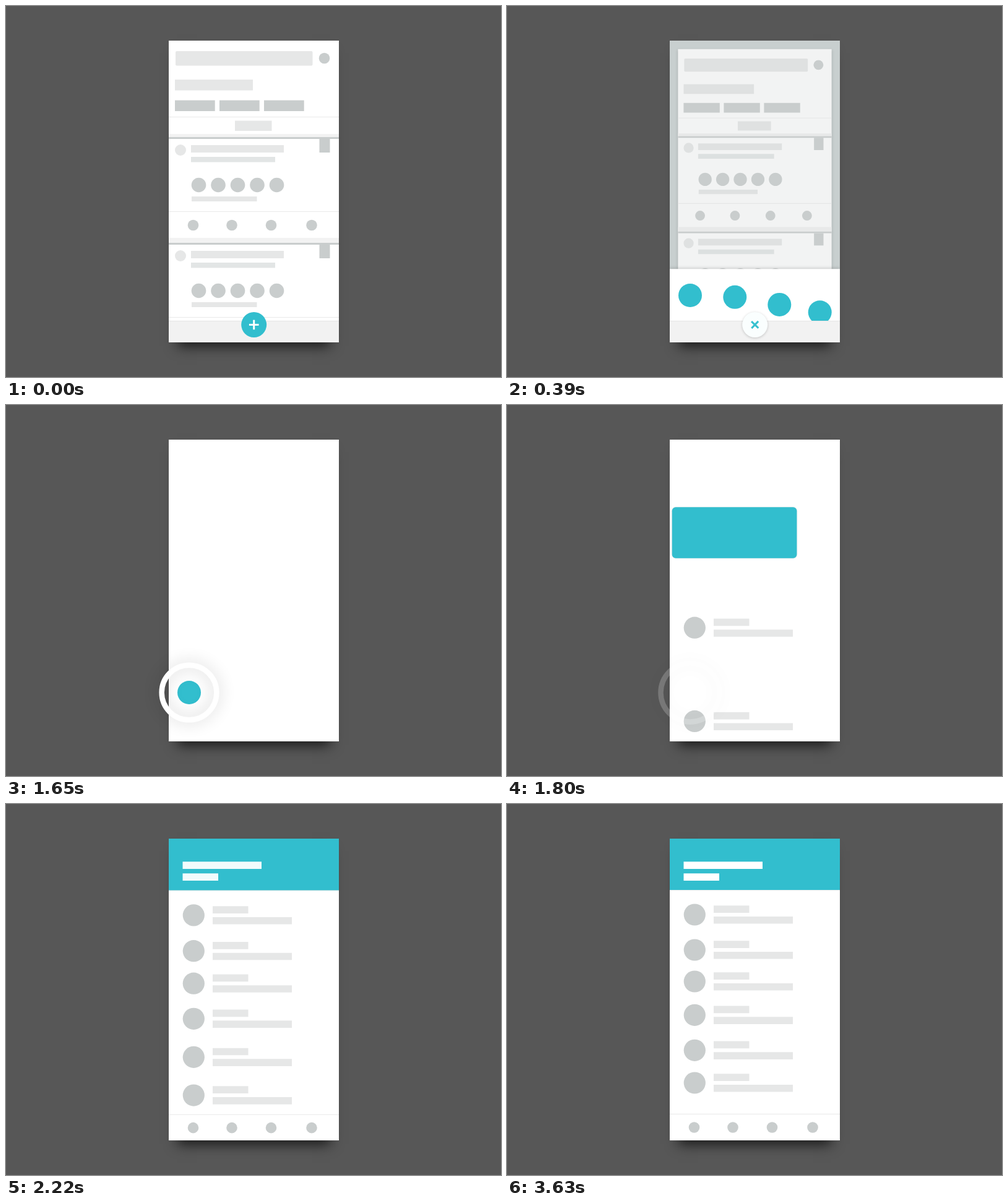
An HTML page with a canvas that plays this animation: 800 px wide and 600 px high, repeating every 3.69 s.

```html
<!DOCTYPE html>
<html lang="en">
<head>
<meta charset="utf-8">
<title>App wireframe transition</title>
<style>
  html, body { margin: 0; width: 100%; height: 100%; overflow: hidden; background: #575757; }
  canvas { display: block; }
</style>
</head>
<body>
<canvas id="stage" width="800" height="600"></canvas>
<script>
const ctx = document.getElementById('stage').getContext('2d');
const LOOP = 3690, STEP = 30;
const OPEN = 30, DETAIL = 1650;
const TEAL = '#32bece', GREY = '#c9cdcd', LIGHT = '#e6e7e7', LINE = '#e9e9e9', STRIP = '#f2f2f2';
const SCREEN = { x: 263, y: 56, w: 275, h: 488 };
const NAV_X = [302.5, 365, 428.5, 494];
const MENU_X = [296, 368.3, 440.3, 505.7];
const MENU_START = [30, 80, 170, 215];
const LIST_Y = [179, 236, 287, 341.3, 398.3, 451];

// Remaining part (1 to 0) of a critically damped spring
function rest(t, start, rate = 0.0155) {
  const x = Math.max(0, t - start) * rate;
  return (1 + x) * Math.exp(-x);
}
const mix = (a, b, p) => a + (b - a) * p;

function box(x1, y1, x2, y2, color, radius = 0) {
  ctx.fillStyle = color;
  ctx.beginPath();
  ctx.roundRect(x1, y1, x2 - x1, y2 - y1, radius);
  ctx.fill();
}

function dot(x, y, r, color) {
  ctx.fillStyle = color;
  ctx.beginPath();
  ctx.arc(x, y, r, 0, 2 * Math.PI);
  ctx.fill();
}

const fillScreen = color => box(SCREEN.x, SCREEN.y, SCREEN.x + SCREEN.w, SCREEN.y + SCREEN.h, color);

// Run a drawing with a soft shadow
function shaded(alpha, blur, dy, draw) {
  ctx.save();
  ctx.shadowColor = `rgba(0,0,0,${alpha})`;
  ctx.shadowBlur = blur;
  ctx.shadowOffsetY = dy;
  draw();
  ctx.restore();
}

function drawFrame() {
  ctx.fillStyle = '#575757';
  ctx.fillRect(0, 0, 800, 600);
  shaded(0.75, 20, 6, () => box(277, 70, 524, 544, '#333'));
}

function drawCard(top) {
  box(263, top - 3, 538, top, GREY);
  dot(282, top + 18, 9, LIGHT);
  box(299, top + 10, 449, top + 22, LIGHT);
  box(299, top + 29, 435, top + 37.5, '#e2e5e5');
  box(506.5, top, 523.5, top + 22, GREY);
  for (let i = 0; i < 5; i++) dot(311.5 + 31.5 * i, top + 74.5, 11.8, GREY);
  box(300, top + 93, 405.5, top + 101, LIGHT);
  box(263, top + 117, 538, top + 118, LINE);
  for (const x of NAV_X) dot(x, top + 139.5, 8.8, GREY);
  box(263, top + 160, 538, top + 168, STRIP);
}

function drawHome(p) {
  ctx.save();
  const scale = mix(1, 0.9, p);
  ctx.translate(400.5, 56 + 14 * p);
  ctx.scale(scale, scale);
  ctx.translate(-400.5, -56);
  shaded(0.16 * p, 5, 1, () => box(263, 56, 538, 600, '#fff'));
  box(274, 73, 495.5, 96.5, LIGHT, 2);
  dot(514.5, 84.5, 8.8, GREY);
  box(273, 119, 399, 136.5, LIGHT);
  for (const x of [273, 345, 417]) box(x, 152.5, x + 64.7, 170, GREY);
  box(263, 179, 538, 180, LINE);
  box(370, 185.5, 429.5, 202, LIGHT);
  box(263, 207, 538, 212, STRIP);
  drawCard(215);
  drawCard(386);
  ctx.globalAlpha = 0.25 * p;
  box(263, 56, 538, 600, '#c8cfcf');
  ctx.restore();
}

function drawButton(p) {
  const x = 400.7, y = 515.5;
  shaded(0.2 * p, 4, 1, () => dot(x, y, 20.5, '#fff'));
  ctx.save();
  ctx.globalAlpha = 1 - p;
  dot(x, y, 20.5, TEAL);
  ctx.restore();
  ctx.save();
  ctx.translate(x, y);
  ctx.rotate(p * Math.PI / 4);
  const color = `rgb(${mix(255, 50, p)},${mix(255, 190, p)},${mix(255, 206, p)})`;
  box(-7.8, -1.5, 7.8, 1.5, color);
  box(-1.5, -7.8, 1.5, 7.8, color);
  ctx.restore();
}

function drawMenu(t) {
  const p = 1 - rest(t, OPEN);
  fillScreen('#c8cfcf');
  drawHome(p);
  shaded(0.18 * p, 5, -1, () => box(263, mix(509, 423, p), 538, 544, '#fff'));
  MENU_X.forEach((x, i) => dot(x, 465 + 123 * rest(t, MENU_START[i]), 19, TEAL));
  box(263, 509, 538, 544, STRIP);
  box(263, 509, 538, 510, '#e6e6e6');
  drawButton(p);
}

function drawDetail(t) {
  fillScreen('#fff');
  LIST_Y.forEach((finalY, i) => {
    const y = finalY + (407 - 16 * i) * rest(t, DETAIL + 30 + 50 * i);
    dot(303.3, y, 17.6, GREY);
    box(334, y - 14.7, 391.5, y - 3, LIGHT);
    box(334, y + 3, 462, y + 14.6, LIGHT);
  });

  const navY = 43 * rest(t, 1820);
  box(263, 501 + navY, 538, 544 + navY, '#fff');
  box(263, 501 + navY, 538, 502 + navY, LINE);
  for (const x of NAV_X) dot(x, 523 + navY, 8.8, GREY);

  // The tapped circle grows into the header
  const p = 1 - rest(t, DETAIL, 0.0158);
  shaded(0.2 * p, 2, 0, () => box(
    mix(277, 262, p), mix(446, 36, p), mix(315, 539, p), mix(484, 139, p), TEAL, 19 * (1 - p)));
  ctx.save();
  ctx.globalAlpha = 1 - rest(t, 1938);
  box(285.5, 93.3, 413, 105, '#fff');
  box(285.5, 112.3, 343, 124, '#fff');
  ctx.restore();
}

function drawTouch(t, start, x, y) {
  const age = t - start;
  if (age <= 0 || age > 300) return;
  const radius = 52 - 30 * Math.exp(-age / 55);
  ctx.save();
  ctx.globalAlpha = Math.min(1, age / 60, (300 - age) / 150);
  ctx.strokeStyle = '#fff';
  ctx.lineWidth = 8.5;
  ctx.shadowColor = 'rgba(0,0,0,0.2)';
  ctx.shadowBlur = 26;
  ctx.beginPath();
  ctx.arc(x, y, radius - 4.25, 0, 2 * Math.PI);
  ctx.stroke();
  ctx.restore();
}

function render(t) {
  drawFrame();
  ctx.save();
  ctx.beginPath();
  ctx.rect(SCREEN.x, SCREEN.y, SCREEN.w, SCREEN.h);
  ctx.clip();
  if (t < DETAIL) drawMenu(t);
  else drawDetail(t);
  ctx.restore();
  drawTouch(t, 0, 400.7, 515.5);
  drawTouch(t, 1530, 296, 465);
}

const begin = performance.now();
function tick() {
  const t = (performance.now() - begin) % LOOP;
  render(Math.floor(t / STEP) * STEP);
  requestAnimationFrame(tick);
}
tick();
</script>
</body>
</html>
```
